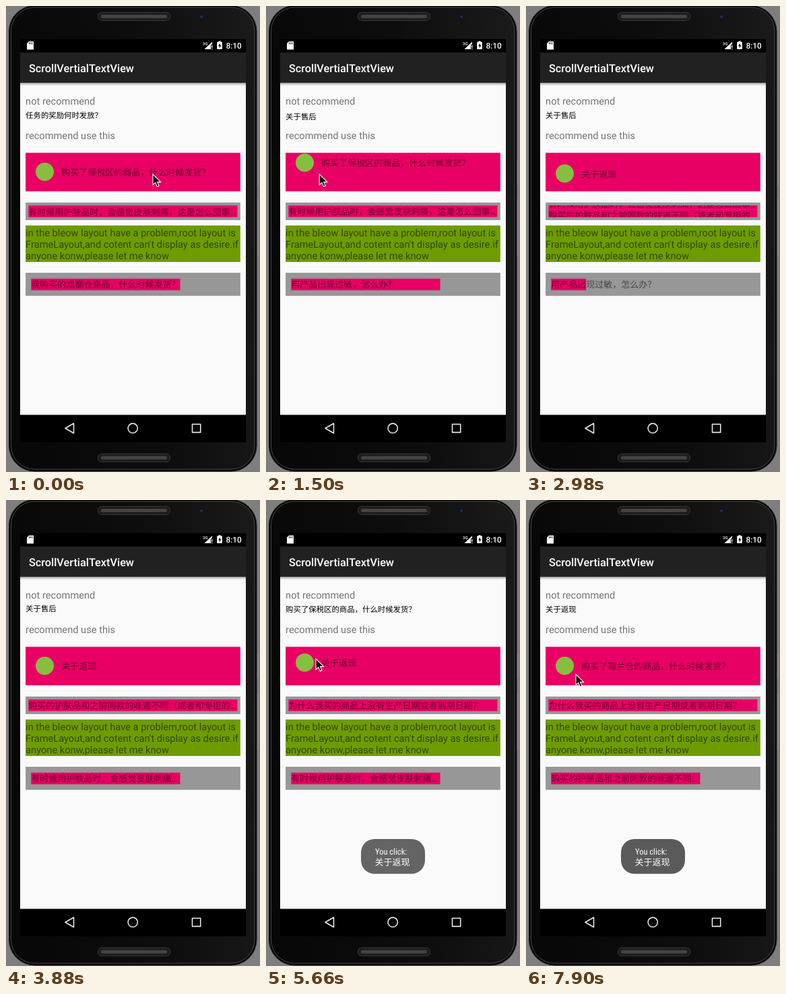
An HTML page for the animation above (8000 ms loop, 377 px wide and 690 px high).

```html
<!DOCTYPE html>
<html lang="zh-CN">
<head>
<meta charset="utf-8">
<title>ScrollVertialTextView</title>
<style>
html, body { margin: 0; width: 100%; height: 100%; overflow: hidden; background: #7e7e7e; }
#stage { display: block; width: 377px; height: 690px; }
text { font-family: Roboto, "Noto Sans CJK SC", "Noto Sans CJK", sans-serif; white-space: pre; text-rendering: geometricPrecision; }
.note { font-size: 14.65px; fill: #757575; }
.dim { fill: #000; fill-opacity: .54; }
.bold { font-weight: 500; fill: #fff; }
.toast { font-family: "Roboto Condensed", Roboto, "Noto Sans CJK SC", "Noto Sans CJK", sans-serif; font-stretch: 75%; fill: #fff; }
.nav { fill: none; stroke: #e8e8e8; stroke-width: 1.6; stroke-linejoin: round; }
</style>
</head>
<body>
<svg id="stage" viewBox="0 0 377 690">
  <defs>
    <linearGradient id="shell" x1="0" y1=".15" x2="1" y2="0">
      <stop offset="0" stop-color="#080808"/>
      <stop offset=".5" stop-color="#0d0d0d"/>
      <stop offset="1" stop-color="#1a1a1a"/>
    </linearGradient>
    <linearGradient id="shade" x2="0" y2="1">
      <stop offset="0" stop-color="#000" stop-opacity=".32"/>
      <stop offset="1" stop-color="#000" stop-opacity="0"/>
    </linearGradient>
    <g id="speaker">
      <rect x="136.5" width="107" height="12" rx="5" fill="#1c1c1c" stroke="#383838"/>
      <rect x="141" y="3.5" width="98" height="5" rx="2.5" fill="#444"/>
    </g>
  </defs>

  <!-- phone -->
  <path d="M372 227h2.5v38H372zM372 286h2.5v84H372z" fill="#8a8a8a"/>
  <rect x="4.5" y="-.5" width="367.5" height="689.5" rx="38" fill="#050505" stroke="#1c1c1c"/>
  <rect x="7.5" y="2" width="361.5" height="684" rx="35" fill="url(#shell)" stroke="#484848"/>
  <use href="#speaker" y="9.5"/>
  <use href="#speaker" y="663"/>
  <circle cx="290" cy="16" r="4.5" fill="#10131f"/>
  <circle cx="290" cy="16" r="2" fill="#24304f"/>

  <!-- system bars -->
  <rect x="21" y="49" width="335" height="597"/>
  <path d="M34 52.5h7v12H31v-9z" fill="#fff"/>
  <path d="M34.5 54v2.5M36.7 54v2.5M38.9 54v2.5" stroke="#000"/>
  <path d="M306 53v11h-11.5z" fill="#fff"/>
  <path d="M304 57h3v8h-3z"/>
  <path d="M305 58h1.3v4H305zM305 63h1.3v1.2H305z" fill="#fff"/>
  <text x="292" y="58" class="bold" font-size="6">3G</text>
  <path d="M315.5 52h3v1.3h2.3V64h-7.6V53.3h2.3z" fill="#fff"/>
  <path d="M317.8 55l-2.8 4.2h1.7v3.3l2.8-4.3h-1.7z"/>
  <text x="326.5" y="63" class="bold" font-size="11.8">8:10</text>
  <path class="nav" d="M100.5 618v14.5L88 625.2zM276.5 619.2h12.2v12.2h-12.2z"/>
  <circle class="nav" cx="188.2" cy="625.2" r="7.1"/>

  <!-- page -->
  <rect x="21" y="113" width="335" height="492.4" fill="#fafafa"/>
  <rect x="21" y="68.7" width="335" height="45.1" fill="#212121"/>
  <rect x="21" y="113.8" width="335" height="4.5" fill="url(#shade)"/>
  <text x="34" y="97.6" class="bold" font-size="16.28">ScrollVertialTextView</text>
  <text x="29.1" y="146" class="note">not recommend</text>
  <text x="29.1" y="197" class="note">recommend use this</text>
  <rect x="29.1" y="217.4" width="318.7" height="57" fill="#e80064"/>
  <rect x="29.1" y="291" width="318.7" height="26" fill="#979797"/>
  <rect x="29.1" y="325" width="318.7" height="54" fill="#6e9c00"/>
  <g class="dim" font-size="14.65">
    <text x="29.1" y="341">in the bleow layout have a problem,root layout is</text>
    <text x="29.1" y="358">FrameLayout,and cotent can't display as desire.if</text>
    <text x="29.1" y="375">anyone konw,please let me know</text>
  </g>
  <rect x="29.1" y="395" width="318.7" height="34.2" fill="#979797"/>

  <g id="rows"></g>

  <g id="toast">
    <rect id="toastBox" x="141" y="502" width="95" height="51.5" rx="20"/>
    <text x="162" y="525.3" class="toast" font-size="12.5">You click:</text>
    <text x="161.5" y="540.8" class="toast" font-size="13.03">关于返现</text>
  </g>
  <path id="cursor" d="M0 0V16L3.8 12.6 6.3 18.4 9 17.2 6.5 11.6H11.6Z" fill="#000" stroke="#fff" stroke-width="1.1"/>
</svg>

<script>
const LOOP = 8000, STEP = 150;
const resyncs = [0, 3280, 5520, 5660, 6700];
const bonded = '购买了保税区的商品，什么时候发货？';
const smell = '购买的护肤品和之前同款的味道不同';
const sting = '有时候用护肤品时，会感觉皮肤刺痛';
const allergy = '用产品出现过敏，怎么办？';

// box: x, y, width, height of the clip; base: text baseline at rest
const rows = [
  { box: [29.1, 149, 318.7, 24.6], base: 165.7, size: 11.4, travel: 20, dur: 1150,
    starts: [610, 3710, 6700],
    texts: ['任务的奖励何时发放？', '关于售后', bonded, '关于返现'] },
  { box: [29.1, 217.4, 318.7, 57], base: 251, size: 13.03, travel: 57, dur: 2500, indent: 53, icon: true, dim: true,
    starts: [690, 5190],
    texts: [bonded, '关于返现', '购买了荷兰仓的商品，什么时候发货？'] },
  { box: [33.2, 295.2, 310.5, 17.5], base: 309.2, size: 13.03, travel: 17.5, dur: 1000, chip: 310.5, dim: true,
    starts: [-850, 2250, 4640, 7800],
    texts: [allergy, sting + '，这是怎么回事…', smell + '（或者和专柜的…',
      '为什么我买的商品上没有生产日期或者到期日期？', '任务的奖励何时发放？'] },
  { box: [37.2, 403.4, 221.5, 17.5], base: 417.3, size: 13.03, travel: 17.5, dur: 1000, chip: 221.5, leaving: 52, dim: true,
    starts: [110, 2850, 5700],
    texts: ['我购买的成都仓商品，什么时候发货？', allergy, sting + '…', smell + '…'] }
];

// time, x, y of the pointer tip
const pointer = [
  [0, 218, 249], [900, 220.5, 240], [1200, 220.5, 240], [1700, -15, 255],
  [4900, -15, 245], [5400, 74, 235], [7300, 74, 235], [7750, 74, 258], [LOOP, 74, 258]
];

const $ = id => document.getElementById(id);
const clamp = v => Math.min(1, Math.max(0, v));
const ease = p => (1 - Math.cos(Math.PI * clamp(p))) / 2;
const mix = (a, b, p) => a + (b - a) * p;

function add(parent, tag, attrs) {
  const el = document.createElementNS('http://www.w3.org/2000/svg', tag);
  for (const key in attrs) el.setAttribute(key, attrs[key]);
  return parent.appendChild(el);
}

function makeItem(row, text, view) {
  const [x, y, , h] = row.box;
  const g = add(view, 'g', {});
  const chip = row.chip && add(g, 'rect', { y: 0, width: row.chip, height: h, fill: '#e80064' });
  if (row.icon) add(g, 'circle', { cx: 57.5 - x, cy: 245.5 - y, r: 13.5, fill: '#86bf40' });
  const label = add(g, 'text', {
    x: row.indent || 0, y: row.base - y, 'font-size': row.size, class: row.dim ? 'dim' : ''
  });
  label.textContent = text;
  return { g, chip };
}

for (const row of rows) {
  const [x, y, width, height] = row.box;
  const view = add($('rows'), 'svg', { x, y, width, height, overflow: 'hidden' });
  row.items = row.texts.map(text => makeItem(row, text, view));
}

function drawRow(row, t) {
  const now = row.starts.filter(s => s <= t).length;
  const p = now ? ease((t - row.starts[now - 1]) / row.dur) : 1;
  row.items.forEach(({ g, chip }, i) => {
    const leaving = i === now - 1 && p < 1;
    g.style.display = i === now || leaving ? '' : 'none';
    g.setAttribute('transform', `translate(0 ${row.travel * (leaving ? -p : 1 - p)})`);
    if (chip && row.leaving) chip.setAttribute('width', leaving ? row.leaving : row.chip);
  });
}

function drawPointer(t) {
  const i = pointer.findIndex(k => k[0] > t);
  const [t0, x0, y0] = pointer[i - 1], [t1, x1, y1] = pointer[i];
  const p = (t - t0) / (t1 - t0);
  $('cursor').setAttribute('transform', `translate(${mix(x0, x1, p)} ${mix(y0, y1, p)})`);
}

// The screen refreshes in steps, as a recorded screen does.
function refreshTime(t) {
  const from = resyncs.filter(r => r <= t).pop();
  return from + Math.floor((t - from) / STEP) * STEP;
}

function draw(t) {
  rows.forEach(row => drawRow(row, t));
  drawPointer(t);
  $('toast').style.display = t >= 5660 ? '' : 'none';
  const grey = Math.round(mix(100, 90, clamp((t - 6850) / 900)));
  $('toastBox').setAttribute('fill', `rgb(${grey},${grey},${grey})`);
}

const began = performance.now();
function tick() {
  draw(refreshTime((performance.now() - began) % LOOP));
  requestAnimationFrame(tick);
}
tick();
</script>
</body>
</html>
```
